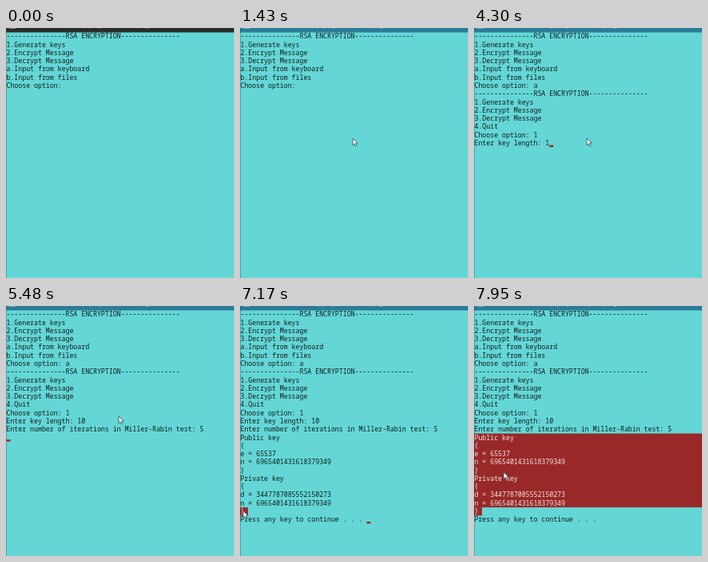
Recreate the animation shown at these times as an HTML page. Size 285 by 313 pixels, loop 8000 ms.

```html
<!DOCTYPE html>
<html lang="en">
<head>
<meta charset="utf-8">
<title>RSA console</title>
<style>
  html, body { margin: 0; width: 100%; height: 100%; overflow: hidden; background: #64d6d6; }
  svg { display: block; width: 285px; height: 313px; }
  #console text { font: 8.22px "Noto Sans Mono", "DejaVu Sans Mono", monospace; white-space: pre; }
  #title { font: 8px "Open Sans", sans-serif; }
</style>
</head>
<body>
<svg viewBox="0 0 285 313" xmlns="http://www.w3.org/2000/svg">
  <rect width="285" height="313" fill="#64d6d6"/>
  <rect id="bar" width="285" height="5.5"/>
  <rect x="4" y="-5" width="8" height="5.5" fill="#d8dcdc"/>
  <text id="title" x="16" y="-0.6">C:\Users\user\Desktop\project\rsa\bin\program.exe</text>
  <rect id="selection" width="285" fill="#992929"/>
  <rect id="selectionEnd" width="10" fill="#992929"/>
  <g id="console"></g>
  <rect id="caret" width="4.9" height="2.5" fill="#9b2929"/>
  <rect width="0.8" height="313" fill="#1d5f68" opacity=".5"/>
  <path id="mouse" d="M0 0V8.6L2 6.8L3.4 9.9L4.9 9.2L3.5 6.2H6.2Z" fill="#fff" stroke="#1c3338" stroke-width=".7" stroke-linejoin="round"/>
</svg>
<script>
const LOOP = 8000, FOCUS = 130, KEY_DELAY = 130, BLINK = 530;
const TOP = 5.4, ROW = 10.28, COL = 4.932, LEFT = 0.5;
const DRAG_START = 7160, DRAG_END = 7690, LAST_SELECTED = 24;
const $ = id => document.getElementById(id);

const dashes = "-".repeat(15);
const header = `${dashes}RSA ENCRYPTION${dashes}\n1.Generate keys\n2.Encrypt Message\n3.Decrypt Message\n`;
const modulus = "n = 6965401431618379349";

const print = (at, text) => ({ at, show: () => text });
const type = (at, text) => ({ at, show: t => text.slice(0, 1 + Math.floor((t - at) / KEY_DELAY)) });

const session = [
  print(0, header + "a.Input from keyboard\nb.Input from files\nChoose option: "),
  type(2080, "a"),
  print(2470, "\n" + header + "4.Quit\nChoose option: "),
  type(3120, "1"),
  print(3250, "\nEnter key length: "),
  type(4300, "10"),
  print(4960, "\nEnter number of iterations in Miller-Rabin test: "),
  type(5220, "5"),
  print(5350, "\n"),
  print(5610, `Public key\n{\ne = 65537\n${modulus}\n}\nPrivate key\n{\nd = 3447787085552150273\n${modulus}\n}\nPress any key to continue . . . `)
];

// Key points of the pointer: time, x, y
const path = [[650, 290, -12], [1420, 141, 138], [5480, 141, 138], [6000, 51, 245],
  [7040, 4, 256.5], [7200, 4, 256.5], [7420, -8, 184], [DRAG_END, -8, 163], [7950, 37, 208]];

const lines = Array.from({ length: 26 }, (_, row) => {
  const line = document.createElementNS("http://www.w3.org/2000/svg", "text");
  line.setAttribute("x", LEFT);
  line.setAttribute("y", TOP + ROW * row + 7.9);
  return $("console").appendChild(line);
});

function set(id, attributes) {
  for (const name in attributes) $(id).setAttribute(name, attributes[name]);
}

function pointerAt(t) {
  const next = path.findIndex(point => point[0] >= t);
  if (next <= 0) return path.at(next).slice(1);
  const [t0, x0, y0] = path[next - 1], [t1, x1, y1] = path[next];
  const u = (t - t0) / (t1 - t0), k = u * u * (3 - 2 * u);
  return [x0 + (x1 - x0) * k, y0 + (y1 - y0) * k];
}

// While dragging, the selection starts at the row under the pointer
function firstSelectedRow(t) {
  if (t < DRAG_START) return Infinity;
  const [, y] = pointerAt(Math.min(t, DRAG_END));
  return Math.floor((y - TOP) / ROW);
}

function draw(t) {
  const active = t >= FOCUS;
  set("bar", { fill: active ? "#2b7b99" : "#2b2b2b" });
  set("title", { fill: active ? "#b9d3dc" : "#999" });

  const rows = session.filter(s => s.at <= t).map(s => s.show(t)).join("").split("\n");
  const first = firstSelectedRow(t), selecting = first <= LAST_SELECTED;
  lines.forEach((line, row) => {
    line.textContent = rows[row] || "";
    line.setAttribute("fill", row >= first && row <= LAST_SELECTED ? "#f3e6e4" : "#101c1c");
  });

  const endY = TOP + ROW * LAST_SELECTED;
  const startY = selecting ? TOP + ROW * first : endY;
  set("selection", { y: startY, height: endY - startY });
  set("selectionEnd", { y: endY, height: selecting ? ROW : 0 });

  const caretLit = active && (t + 310) % (2 * BLINK) < BLINK;
  set("caret", {
    x: LEFT + rows.at(-1).length * COL,
    y: TOP + ROW * rows.length - 2.7,
    visibility: caretLit ? "visible" : "hidden"
  });

  const [x, y] = pointerAt(t);
  set("mouse", { transform: `translate(${x} ${y})` });
}

function frame(now) {
  draw(now % LOOP);
  requestAnimationFrame(frame);
}
draw(0);
requestAnimationFrame(frame);
</script>
</body>
</html>
```
